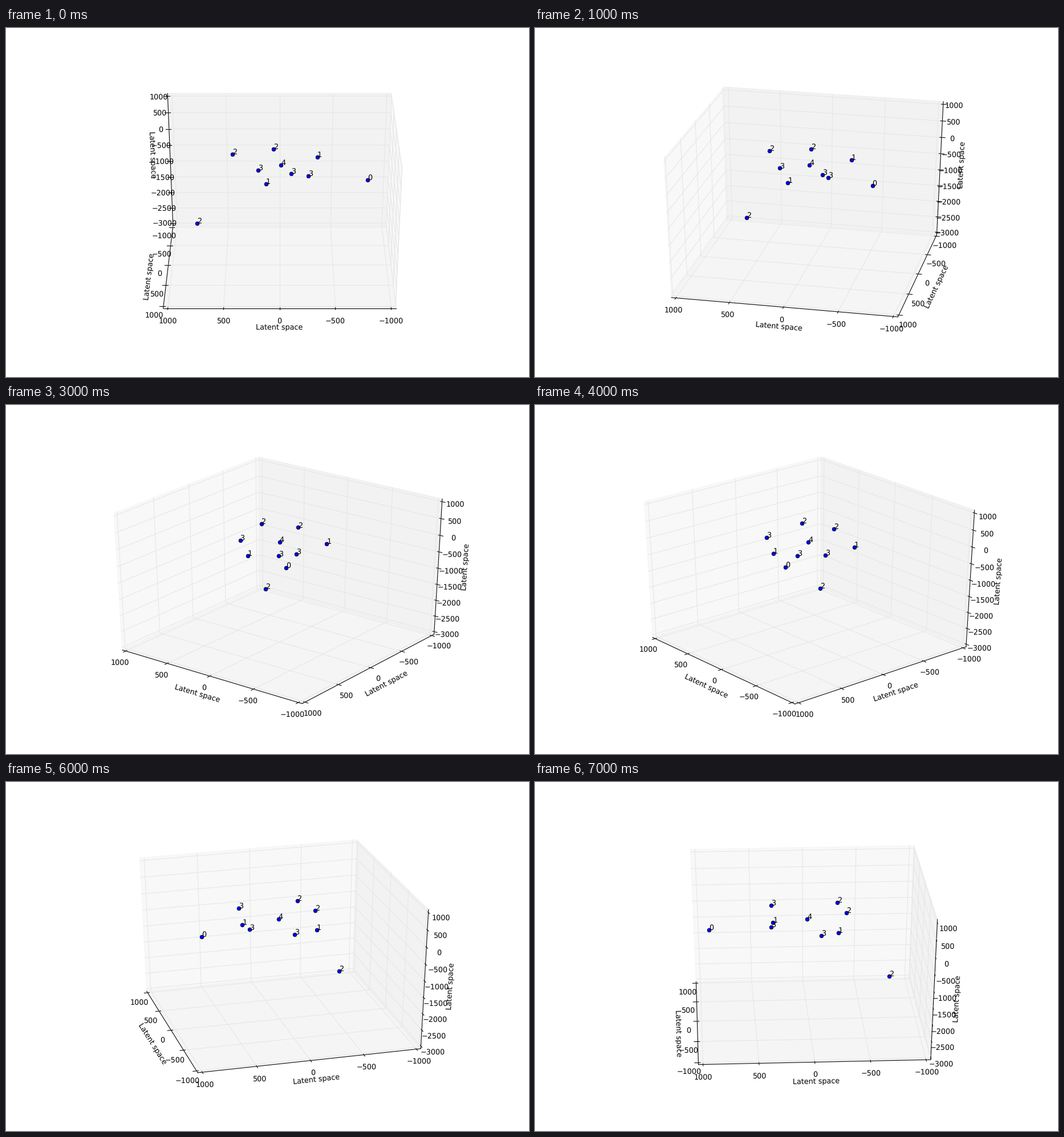
Write a matplotlib script that moves like this. It is 917 by 611 pixels and loops after 8 s.

```python
import itertools
import math

import matplotlib.pyplot as plt
import numpy as np
from matplotlib.animation import FuncAnimation
from matplotlib.patches import Polygon

W, H = 917, 611
FRAMES, INTERVAL = 8, 1000
START_AZIM, STEP = 90, 360 / 29
ELEV = math.radians(30)
DIST = 10

# At 72 dpi one point is one pixel; PT scales sizes meant for a 12 inch wide figure.
PT = W / 12 / 72
FONT = 12.8
LINE = PT

# Plot area, with slightly more room at the left and bottom
SX, SY = W * 0.775 / 1.85, H * 0.8 / 1.85
CX, CY = W * 0.125 + 0.95 * SX, H * 0.1 + 0.95 * SY

# The data cube spans -0.5 to 0.5; the panes lie a little outside it
DELTA = 1 / 12
EDGE = 0.5 + DELTA / 4
PAD = 4 / (864 * (0.775 + 0.8 * H / W))
TICK_PAD, LABEL_PAD = 12 * PAD, 26 * PAD

PANE_GREY = (0.95, 0.9, 0.925)
TICKS = (range(-1000, 1001, 500), range(-1000, 1001, 500), range(-3000, 1001, 500))
CENTERS = (0, 0, -1000)
SPANS = (2000, 2000, 4000)
TICK_DIR = (1, 0, 0)
FLIPS = ((1, 0), (0, 1), (0, 2))

POINTS = [
    ("2", 0.215, -0.144, 0.258),
    ("2", 0.0276, -0.174, 0.279),
    ("1", -0.1726, -0.1237, 0.2455),
    ("4", -0.0061, 0.007, 0.258),
    ("3", 0.095, 0.1656, 0.3085),
    ("3", -0.0529, -0.0548, 0.159),
    ("3", -0.1275, 0.1736, 0.27),
    ("1", 0.06, 0.1577, 0.201),
    ("0", -0.3782, 0.4508, 0.396),
    ("2", 0.398, -0.4115, -0.4345),
]

plt.rcParams["font.family"] = "DejaVu Sans"
plt.rcParams["text.hinting"] = "none"

fig = plt.figure(figsize=((W + 0.01) / 72, (H + 0.01) / 72), dpi=72, facecolor="white")
ax = fig.add_axes([0, 0, 1, 1])


def make_projection(azim):
    ca, sa = math.cos(azim), math.sin(azim)
    ce, se = math.cos(ELEV), math.sin(ELEV)

    def project(p):
        x, y, z = p
        near = x * ca + y * sa
        side = y * ca - x * sa
        depth = 1 - (near * ce + z * se) / DIST
        return CX + SX * side / depth, CY + SY * (z * ce - near * se) / depth

    return project


def moved(p, axis, value):
    q = np.array(p, dtype=float)
    q[axis] = value
    return q


def pushed_out(p, axis, amount):
    """Move away from the cube's centre in the two other directions."""
    q = np.array(p, dtype=float)
    for k in range(3):
        if k != axis:
            q[k] += amount if q[k] >= 0 else -amount
    return q


def upright(angle):
    angle %= 180
    return angle - 180 if angle > 90 else angle


def draw_line(project, pts, color, layer):
    xs, ys = zip(*map(project, pts))
    ax.plot(xs, ys, color=color, lw=LINE, zorder=next(layer))


def draw_text(pos, text, layer, **style):
    ax.text(*pos, text, fontsize=FONT, color="black", zorder=next(layer), **style)


def draw_pane(project, axis, far, layer):
    j, k = (n for n in range(3) if n != axis)
    corners = []
    for u, v in ((-EDGE, -EDGE), (EDGE, -EDGE), (EDGE, EDGE), (-EDGE, EDGE)):
        corners.append(project(moved(moved(far, j, u), k, v)))
    ax.add_patch(Polygon(corners, closed=False, color=[PANE_GREY[axis]] * 3,
                         alpha=0.5, lw=LINE, zorder=next(layer)))


def draw_axis(project, axis, far, layer):
    first, second = FLIPS[axis]
    start = moved(far, first, -far[first])
    end = moved(start, second, -start[second])
    draw_line(project, (start, end), "black", layer)

    (x0, y0), (x1, y1) = project(start), project(end)
    angle = upright(math.degrees(math.atan2(y1 - y0, x1 - x0)))
    middle = pushed_out((start + end) / 2, axis, LABEL_PAD)
    draw_text(project(middle), "Latent space", layer,
              ha="center", va="center", rotation=angle)

    places = [(t - CENTERS[axis]) / SPANS[axis] for t in TICKS[axis]]
    b, c = (axis + 1) % 3, (axis + 2) % 3
    for place in places:
        bend = moved(far, axis, place)
        draw_line(project, (moved(bend, b, -far[b]), bend, moved(bend, c, -far[c])),
                  "0.9", layer)

    side = TICK_DIR[axis]
    inward = math.copysign(DELTA, far[side])
    for value, place in zip(TICKS[axis], places):
        pos = moved(start, axis, place)
        ends = [moved(pos, side, pos[side] + f * inward) for f in (0.1, -0.2)]
        draw_line(project, ends, "black", layer)
        draw_text(project(pushed_out(pos, axis, TICK_PAD)),
                  str(value).replace("-", "\u2212"), layer, ha="center", va="top")


def draw(i):
    azim = math.radians(START_AZIM + STEP * i)
    project = make_projection(azim)
    layer = itertools.count(1)

    ax.clear()
    ax.set(xlim=(0, W), ylim=(0, H))
    ax.axis("off")

    view = np.array([math.cos(azim), math.sin(azim), math.sin(ELEV)])
    far = np.where(view < -1e-9, EDGE, -EDGE)
    for axis in range(3):
        draw_pane(project, axis, far, layer)
    for axis in range(3):
        draw_axis(project, axis, far, layer)

    spots = [project(p[1:]) for p in POINTS]
    for x, y in spots:
        ax.plot(x, y, "o", ms=6.7, mew=0.8, mfc="#0000ff", mec="black",
                snap=False, zorder=next(layer))
    for spot, point in zip(spots, POINTS):
        draw_text(spot, point[0], layer, ha="left", va="baseline")
    return []


anim = FuncAnimation(fig, draw, frames=FRAMES, interval=INTERVAL, repeat=True, blit=False)
plt.show()
```
